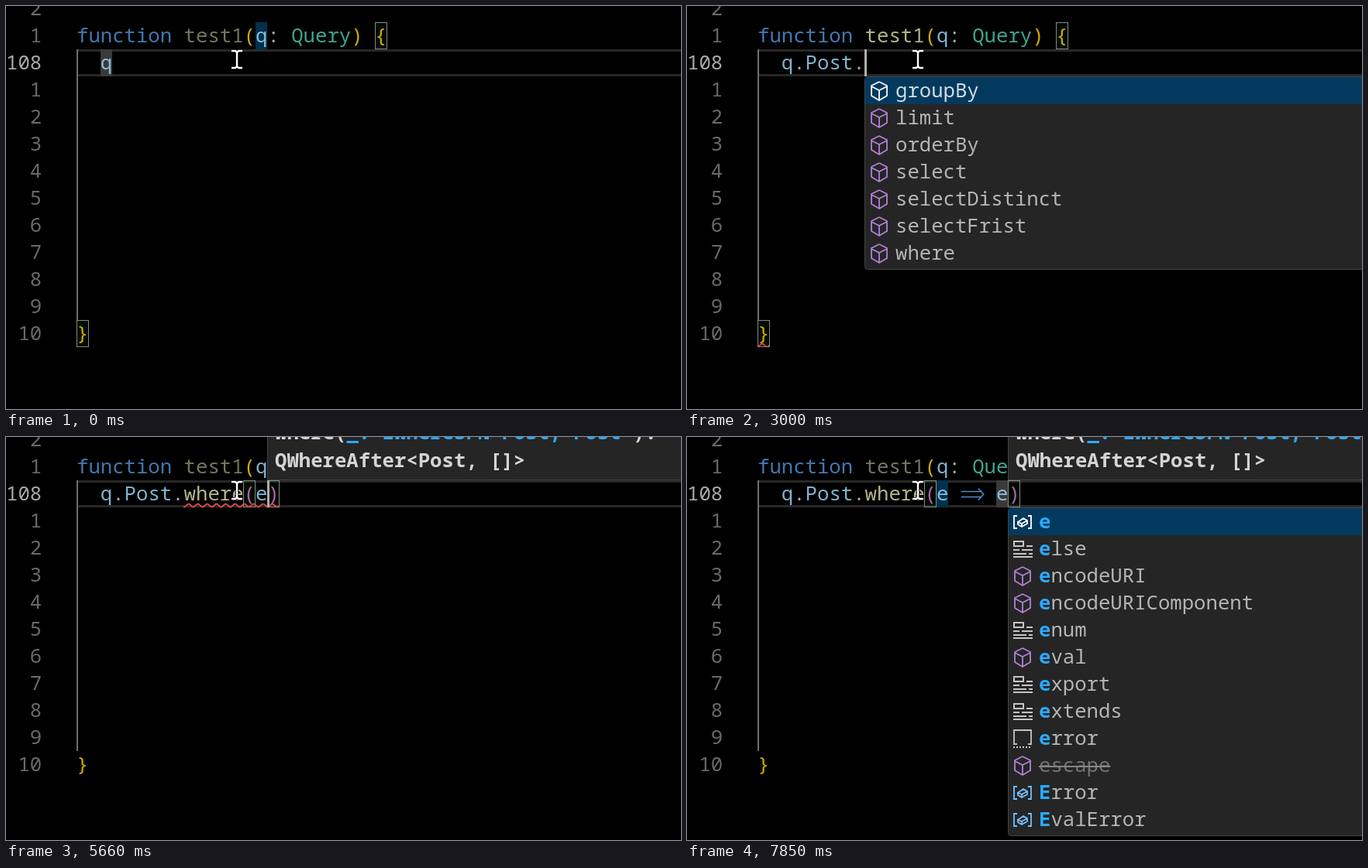
These frames come from a looping animation (871 px wide and 521 px high, 8 s). An HTML page with a canvas:

```html
<!DOCTYPE html>
<html lang="en">
<head>
<meta charset="utf-8">
<title>Editor completion</title>
<style>
  html, body { margin: 0; width: 100%; height: 100%; overflow: hidden; background: #000; }
  canvas { display: block; }
</style>
</head>
<body>
<canvas id="stage" width="871" height="521"></canvas>
<script>
const ctx = document.getElementById('stage').getContext('2d');
const LOOP = 8000, W = 871, H = 521;
const X0 = 91, CELL = 15.4, ROW = 35, TOP = 21, BASE = 26;
const FAMILY = '"Noto Sans Mono", "DejaVu Sans Mono", monospace';
const SIZE = CELL / 0.6;
const LIGHT = 300, BOLD = 700, LIGHT_ALPHA = 0.82;
const C = {
  blue: '#4f94d8', sky: '#9cdcfe', teal: '#4ec9b0', gold: '#ffd000', pink: '#da70d6',
  cream: '#dcdcaa', dimCream: '#8f8f70', plain: '#d4d4d4', gutter: '#808080',
  match: '#2aaaff', panel: '#252526', edge: '#454545', selected: '#04395e',
  red: '#f14c4c', purple: '#b180d7', icon: '#75beff'
};

const items = (kind, names) => names.split(' ').map(name => ({ kind, name }));
const MODELS = items('variable', 'Blog Post Tag User');
const POST = items('variable', 'Post');
const METHODS = items('method', 'groupBy limit orderBy select selectDistinct selectFrist where');
const WHERE = items('method', 'where');
const GLOBALS = [
  ...items('keyword', 'else'), ...items('method', 'encodeURI encodeURIComponent'),
  ...items('keyword', 'enum'), ...items('method', 'eval'),
  ...items('keyword', 'export extends'), ...items('snippet', 'error'),
  { kind: 'method', name: 'escape', old: true }, ...items('variable', 'Error EvalError')
];
const UNBOUND = [...GLOBALS, ...items('variable', 'Event')];
const LOCALS = [...items('variable', 'e'), ...GLOBALS];

// Each step changes part of the editor state from its time onward.
const STEPS = [
  [0, { text: 'q', caret: false, marks: [[0, 15, '#04304d'], [1, 2, '#3a3a3a']], unused: true,
        wave: null, endWave: false, list: null, typed: 0, hint: false, call: false }],
  [270, { text: 'q.', caret: true, marks: [], list: MODELS }],
  [600, { unused: false, endWave: true }],
  [730, { caret: false }],
  [1130, { text: 'q.P', caret: true, list: POST, typed: 1 }],
  [1330, { text: 'q.Po', typed: 2 }],
  [1660, { text: 'q.Post', list: null, wave: [4, 6], unused: true, endWave: false }],
  [1930, { wave: null }],
  [2000, { text: 'q.Post.' }],
  [2070, { list: METHODS, typed: 0 }],
  [2340, { unused: false, endWave: true }],
  [2540, { caret: false }],
  [3000, { caret: true }],
  [3460, { text: 'q.Post.w', list: WHERE, typed: 1 }],
  [3660, { text: 'q.Post.wh', typed: 2 }],
  [3990, { wave: [9, 11], unused: true, endWave: false }],
  [4070, { text: 'q.Post.where', list: null }],
  [4270, { wave: null }],
  [4400, { call: true }],
  [4600, { caret: false }],
  [4800, { text: 'q.Post.where()', caret: true }],
  [4930, { hint: true }],
  [5130, { wave: [9, 99] }],
  [5260, { caret: false }],
  [5660, { text: 'q.Post.where(e)', caret: true }],
  [5730, { list: UNBOUND, typed: 1 }],
  [5990, { text: 'q.Post.where(e )', list: null }],
  [6060, { wave: [15, 16] }],
  [6320, { text: 'q.Post.where(e =)' }],
  [6720, { text: 'q.Post.where(e =>)' }],
  [6790, { unused: false }],
  [6920, { wave: [9, 14] }],
  [7120, { text: 'q.Post.where(e => )' }],
  [7320, { text: 'q.Post.where(e => e)' }],
  [7390, { list: LOCALS, typed: 1 }],
  [7590, { wave: null, unused: true }],
  [7850, { caret: false, marks: [[1, 15, '#04304d'], [1, 20, '#3a3a3a']] }]
];

const stateAt = t => Object.assign({}, ...STEPS.filter(s => s[0] <= t).map(s => s[1]));
const colX = col => X0 + col * CELL;
const rowY = row => TOP + row * ROW;

function rect(x, y, w, h, color) {
  ctx.fillStyle = color;
  ctx.fillRect(x, y, w, h);
}

// Light text is drawn slightly transparent to look as thin as a light face.
function text(str, x, y, color, weight = LIGHT) {
  ctx.font = `${weight} ${SIZE}px ${FAMILY}`;
  ctx.fillStyle = color;
  ctx.globalAlpha = weight === LIGHT ? LIGHT_ALPHA : 1;
  ctx.fillText(str, x, y);
  ctx.globalAlpha = 1;
  return x + str.length * CELL;
}

function code(row, col, parts) {
  let x = colX(col);
  for (const [str, color] of parts) x = text(str, x, rowY(row) + BASE, color);
}

function line(points, color, width = 1.8) {
  ctx.strokeStyle = color;
  ctx.lineWidth = width;
  ctx.beginPath();
  points.forEach(([x, y]) => ctx.lineTo(x, y));
  ctx.stroke();
}

function wave(row, from, to) {
  const pts = [];
  for (let x = Math.floor(colX(from)); x <= colX(to); x++)
    pts.push([x, rowY(row) + 32.5 + 2 * Math.cos((x - colX(from)) * Math.PI / 6)]);
  line(pts, C.red, 1.6);
}

function bracketBox(row, col) {
  const x = Math.floor(colX(col)) + 0.5, y = rowY(row) + 0.5;
  rect(x, y, 15, 34, 'rgba(0,100,0,.12)');
  ctx.strokeStyle = '#888';
  ctx.lineWidth = 1;
  ctx.strokeRect(x, y, 15, 34);
}

function arrow(col) {
  const x = colX(col), y = rowY(1) + 18;
  for (const dy of [-3.5, 3.5]) line([[x + 1, y + dy], [x + 27, y + dy]], C.blue, 1.4);
  line([[x + 23, y - 7.5], [x + 30, y], [x + 23, y + 7.5]], C.blue, 1.4);
}

const ICONS = {
  method(x, y, color) {
    line([[x, y - 12], [x + 10, y - 7], [x + 10, y + 6], [x, y + 12],
          [x - 10, y + 6], [x - 10, y - 7], [x, y - 12]], color);
    line([[x - 10, y - 6], [x, y - 1], [x + 10, y - 6]], color);
    line([[x, y - 1], [x, y + 12]], color);
  },
  variable(x, y, color) {
    for (const s of [-1, 1])
      line([[x + s * 7, y - 8], [x + s * 11, y - 8], [x + s * 11, y + 8], [x + s * 7, y + 8]], color);
    line([[x - 6, y], [x + 1, y - 5], [x + 6, y - 2], [x + 6, y + 2], [x - 1, y + 6],
          [x - 6, y + 3], [x - 6, y], [x - 1, y + 2], [x + 6, y - 2]], color);
    line([[x - 1, y + 2], [x - 1, y + 6]], color);
  },
  keyword(x, y, color) {
    const bars = [[5, 8, -4], [-12, 8, 1], [-1, 14, 1], [-12, 17, 6], [8, 5, 6], [-12, 25, 10]];
    bars.forEach(([dx, w, dy]) => rect(x + dx, y + dy - 1, w, 2, color));
    ctx.strokeStyle = color;
    ctx.lineWidth = 2;
    ctx.strokeRect(x - 11, y - 10, 12, 6);
  },
  snippet(x, y, color) {
    line([[x - 11, y + 8], [x - 11, y - 11], [x + 11, y - 11], [x + 11, y + 8]], color);
    line([[x - 11, y + 7], [x - 7, y + 7]], color);
    line([[x + 7, y + 7], [x + 11, y + 7]], color);
    for (let dx = -12; dx <= 10; dx += 4) rect(x + dx, y + 10, 2, 2, color);
  }
};
const ICON_COLOR = { method: C.purple, variable: C.icon, keyword: '#c5c5c5', snippet: '#c5c5c5' };

function suggestions(x, list, typed) {
  const y = 91, h = list.length * ROW + 5;
  ctx.beginPath();
  ctx.roundRect(x + 0.5, y + 0.5, W, h - 1, 4);
  ctx.fillStyle = C.panel;
  ctx.fill();
  ctx.strokeStyle = C.edge;
  ctx.lineWidth = 1;
  ctx.stroke();
  list.forEach(({ kind, name, old }, i) => {
    const top = y + 1 + i * ROW, chosen = i === 0;
    if (chosen) rect(x + 1, top, W, ROW, C.selected);
    ICONS[kind](x + 19, top + 18, chosen ? '#fff' : ICON_COLOR[kind]);
    const color = old ? '#858585' : chosen ? '#fff' : C.plain;
    const mid = text(name.slice(0, typed), x + 40, top + BASE, old ? color : C.match, old ? LIGHT : BOLD);
    const end = text(name.slice(typed), mid, top + BASE, color);
    if (old) rect(x + 40, top + 18, end - x - 40, 2, color);
  });
}

function signature(x) {
  rect(x, 0, W, 56, C.edge);
  rect(x + 1, 0, W, 55, C.panel);
  let end = text('where(', x + 10, 3, C.plain, BOLD);
  end = text('_: EWhereSFN<Post, Post>', end, 3, C.match, BOLD);
  text('):', end, 3, C.plain, BOLD);
  text('QWhereAfter<Post, []>', x + 10, 39, C.plain, BOLD);
}

function mouse() {
  const shape = [[[298, 59], [298, 80]], [[291, 58], [296, 58], [298, 60], [300, 58], [305, 58]],
                 [[291, 80], [296, 80], [298, 78], [300, 80], [305, 80]]];
  shape.forEach(p => line(p, '#000', 4));
  shape.forEach(p => line(p, '#fff', 2.4));
}

function gutter() {
  for (let row = -1; row <= 11; row++) {
    const label = row === 1 ? '108' : String(Math.abs(row - 1));
    text(label.padStart(3), 0, rowY(row) + BASE, row === 1 ? '#d0d0d0' : C.gutter);
  }
}

function typedLine(s) {
  const colors = { '.': C.plain, '=': C.plain, '(': C.pink, ')': C.pink };
  if (s.call) colors.where = C.cream;
  for (const m of s.text.matchAll(/=>|\w+|[^\w\s]/g)) {
    const col = m.index + 2;
    if (m[0] === '=>') arrow(col);
    else code(1, col, [[m[0], colors[m[0]] || C.sky]]);
  }
}

function draw(t) {
  const s = stateAt(t);
  const closed = s.text.endsWith(')');
  const caretCol = s.text.length + 2 - (closed ? 1 : 0);
  const caretX = Math.floor(colX(caretCol));

  rect(0, 0, W, H, '#000');
  rect(92, 56, W, 3, '#282828');
  rect(92, 88, W, 3, '#282828');
  rect(91, 56, 2, 350, '#707070');
  s.marks.forEach(([row, col, color]) => rect(Math.round(colX(col)), rowY(row), 15, ROW, color));

  gutter();
  const boxes = closed ? [[1, 14], [1, caretCol]] : [[0, 25], [11, 0]];
  boxes.forEach(([row, col]) => bracketBox(row, col));
  code(0, 0, [['function ', C.blue], ['test1', s.unused ? C.dimCream : C.cream], ['(', C.gold],
              ['q', C.sky], [': ', C.plain], ['Query', C.teal], [') {', C.gold]]);
  typedLine(s);
  code(11, 0, [['}', C.gold]]);

  if (s.wave) wave(1, s.wave[0], Math.min(s.wave[1], s.text.length + 2));
  if (s.endWave) wave(11, 0, 1);
  if (s.hint) signature(caretX);
  if (s.list) suggestions(caretX, s.list, s.typed);
  if (s.caret) rect(caretX, 56, 3, ROW, '#aeafad');
  mouse();
}

const start = performance.now();
function tick() {
  draw((performance.now() - start) % LOOP);
  requestAnimationFrame(tick);
}
tick();
</script>
</body>
</html>
```
